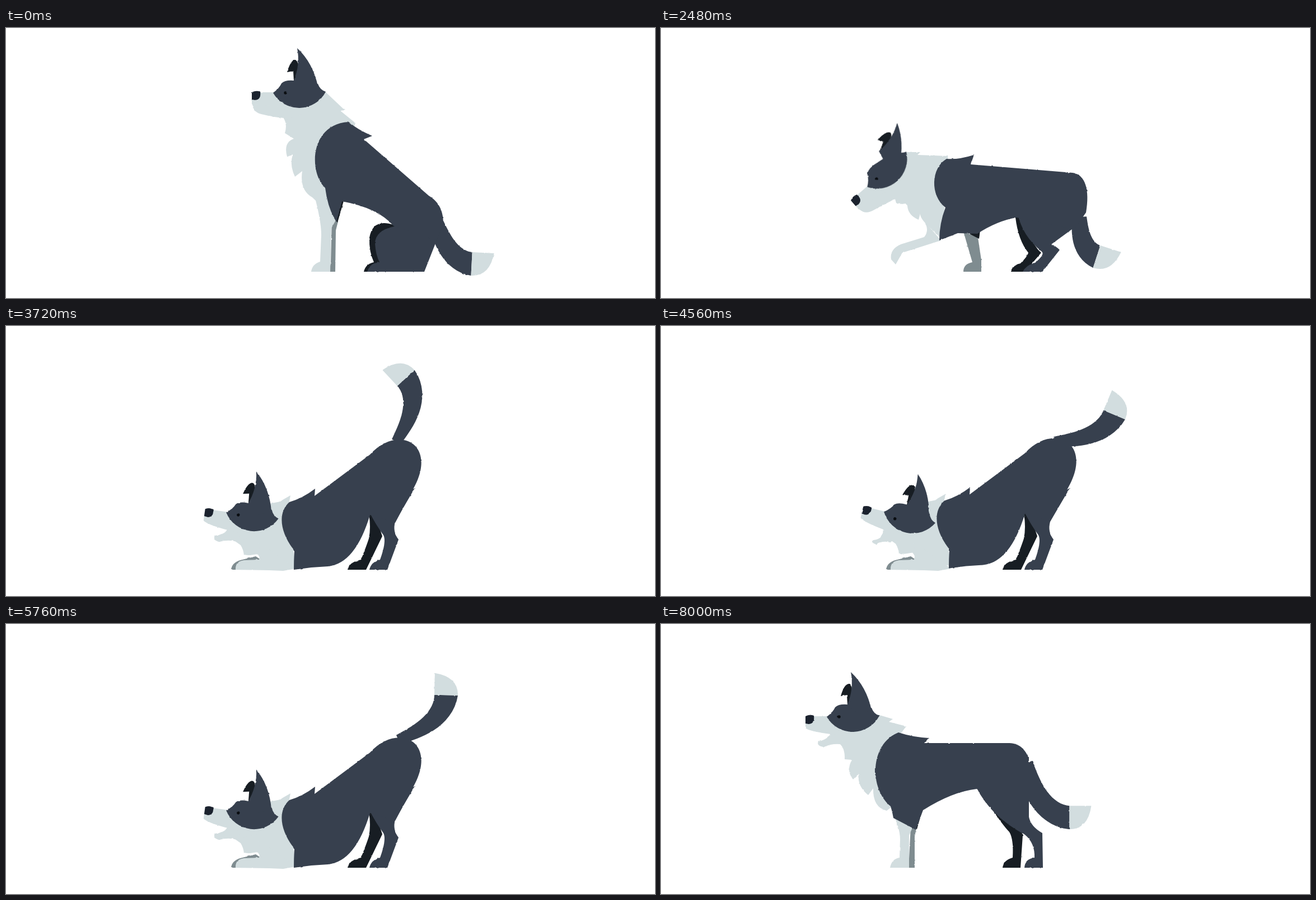
An HTML page that plays this animation: 1159x483 px, repeating every 8040 ms.

```html
<!DOCTYPE html>
<html lang="en">
<head>
<meta charset="utf-8">
<title>Dog</title>
<style>
html, body { margin: 0; width: 100%; height: 100%; overflow: hidden; background: #fff; }
svg { display: block; width: 100%; height: 100%; }
</style>
</head>
<body>
<svg viewBox="0 0 1159 483">
  <defs>
    <filter id="rough" filterUnits="userSpaceOnUse" x="200" y="20" width="700" height="450" color-interpolation-filters="sRGB">
      <feTurbulence type="fractalNoise" baseFrequency=".16" numOctaves="2" seed="4" result="n"/>
      <feDisplacementMap in="SourceGraphic" in2="n" scale="2.2" xChannelSelector="R" yChannelSelector="G"/>
    </filter>
  </defs>
  <g filter="url(#rough)">
    <path id="tail" fill="#37404e"/>
    <path id="tip" fill="#d2dddf"/>
    <g id="parts"></g>
    <g id="head">
      <path fill="#d2dddf" d="M478 115L439 115L439 136Q445 142 484 147L500 165L540 150L562 122Z"/>
      <path id="jaw" fill="#d2dddf"/>
      <path fill="#1b222e" d="M439 115Q447 111 454 114Q456 128 445 129L439 128Z"/>
      <path id="farEar" fill="#171d23" d="M514 95L513 77L502 79Q508 57 517 57Q523 60 523 75L519 97Z"/>
      <path fill="#37404e" d="M477 116A53.5 53.5 0 0 0 571 114Q561 111 557 100L513 94Q498 93 492 99Q488 108 477 116Z"/>
      <path id="ear" fill="#37404e" d="M513 96Q526 66 520 36Q548 62 557 104L535 112Z"/>
      <ellipse id="eye" cx="499" cy="116" rx="2.7" ry="2.7" fill="#0a0d11"/>
    </g>
  </g>
</svg>
<script>
const LOOP = 8040, STEP = 40, WAG = 552;
const DARK = '#37404e', PALE = '#d2dddf', GREY = '#7f8c90', BLACK = '#171d23';
const $ = id => document.getElementById(id);
const lerp = (a, b, k) => a + (b - a) * k;
const ease = k => k < .5 ? 4 * k ** 3 : 1 - 4 * (1 - k) ** 3;
const wave = (t, period) => .5 - .5 * Math.cos(2 * Math.PI * t / period);
const bob = t => 1.08 * wave(t - 3720, 2040);

// Poses: 0 sit, 1 prowl, 2 bow, 3 stretch, 4 stand
const moves = [[1700, 2480, 0, 1], [2480, 3280, 1, 2], [5900, 6640, 2, 3], [6720, 7560, 3, 4]];

const farHind = [
  'M692 352Q655 340 649 375Q648 400 657 419Q642 422 639 436L670 436L670 400Q665 385 680 365L695 355Z',
  'M633 339Q638 380 656 402Q655 408 642 421Q628 424 625 436L650 436L679 402Q665 390 660 370L645 335Z',
  'M648 336Q652 360 648 380Q645 390 634 418Q613 422 610 436L643 436L672 376Q670 370 665 355L655 330Z',
  'M595 315Q612 350 626 370Q632 390 630 418Q613 422 610 436L643 436L651 378Q640 365 640 350L610 315Z',
  'M580 315Q610 360 622 372Q630 385 628 418Q612 422 610 436L642 436L646 378Q640 360 635 350L610 315Z'];

const nearHind = [
  'M693 355Q660 362 659 385Q660 405 667 419Q650 420 645 436L747 436L769 380Q773 370 778 360L760 320Z',
  'M637 332Q645 372 680 400Q686 405 668 420Q652 424 646 436L681 436L712 397Q705 390 697 387L738 357Z',
  'M650 335Q662 358 674 374Q680 385 668 418Q652 422 649 436L681 436L701 382Q690 368 695 350L730 290Z',
  'M580 299Q610 360 650 378Q668 388 666 418Q650 422 649 436L681 436L685 377Q664 360 666 345L672 270Z',
  'M564 294Q590 345 650 377Q668 392 667 418Q650 420 649 436L682 436L681 374Q660 362 657 345L657 285Z'];

const farFore = [
  'M582 340L580 420Q578 430 578 436L588 436L589 362L593 346Z',
  'M540 364L556 419Q540 422 540 436L572 436L572 415L566 375Z',
  'M446 412L418 419Q403 424 402 436L412 436L430 420L455 418Z',
  'M466 372L447 420Q443 430 443 436L449 436L478 392L482 376Z',
  'M446 362L443 420Q443 430 443 436L453 436L453 380L456 366Z'];

const farElbow = [
  'M594 305L604 306L592 348L584 338Z',
  'M550 360L570 362L568 377L552 369Z',
  'M540 410L555 410L555 425L540 425Z',
  'M478 345L490 346L482 379L468 372Z',
  'M458 328L468 328L457 367L445 360Z'];

const nearFore = [
  'M550 297Q563 345 563 370L561 418Q547 422 545 436L579 436L581 358L590 342Z',
  'M470 345Q480 362 470 374L428 387Q408 396 411 414L419 423L431 402L500 380Z',
  'M450 385Q455 405 452 418L425 419Q409 421 410 436L470 437L495 438L518 434Z',
  'M436 355Q446 375 442 390L431 418Q412 422 409 436L443 436L463 385L470 373Z',
  'M412 335Q427 365 427 385L426 418Q412 420 409 436L443 436L443 378L460 340Z'];

const chest = [
  'M568 112L605 147L597 148L624 170L615 200L588 342L547 303Q524 290 529 256L516 266Q506 245 512 227L502 230Q495 205 514 198L498 188Q503 172 495 160L505 125Z',
  'M438 222L463 222L458 227L512 229L515 250L500 376L478 355Q462 340 463 332L460 343Q441 335 440 318L438 314Q425 316 420 313L418 306Q405 312 386 323L400 285Z',
  'M470 318L490 314L494 311L508 303L503 330L518 432L455 420Q453 412 449 408L436 410Q428 410 426 409L425 410Q424 400 419 392L412 387Q403 380 392 380L410 350Z',
  'M358 222L391 220L388 223L423 217L415 240L437 354L408 346Q385 342 373 326L371 331Q350 325 350 304L332 307Q328 300 325 296L318 295Q310 292 300 294L310 262Z',
  'M387 162L414 170L407 175L438 183L425 200L412 327L403 334Q378 328 379 294L370 306Q350 290 353 268L343 278Q330 262 341 243L328 242Q329 220 316 212L325 175Z'];

const body = [
  'M612 168Q628 182 654 193L639 199L755 300C775 312 781 330 781 350L769 380L692 354Q665 322 600 310L590 347L586 340Q574 318 570 286C541 260 541 172 612 168Z',
  'M510 234Q530 236 559 227L553 244L735 259C758 262 766 290 759 330L738 360L635 339Q600 345 565 368L530 367L497 380Q497 350 508 321C480 300 482 250 510 234Z',
  'M506 315Q530 308 552 291L551 304L650 230C700 175 772 210 728 290L695 352L650 338Q624 425 575 430L545 432L514 436Q514 420 515 402C490 370 484 335 506 315Z',
  'M416 228Q440 229 469 219L463 231L618 213C645 206 660 218 674 240L667 350L580 299Q540 310 490 352L470 375L437 361Q433 352 430 350C390 310 386 250 416 228Z',
  'M424 194Q448 202 478 204L470 213L622 213C642 214 650 225 657 240L657 350L564 295Q520 300 468 333L455 368L415 347Q413 335 410 326C372 295 372 215 424 194Z'];

const jaw = [
  'M483 140Q460 138 440 136Q441 152 460 155Q480 160 497 161L510 150Z',
  'M483 146Q480 156 462 160Q458 168 472 170Q485 164 500 165L510 150Z'];

// Eye socket x and y, head turn, ear turn, mouth opening, eye drop
const heads = [
  [499, 116, 0, 0, 0, 0],
  [385, 270, -41, 67, 0, 0],
  [415, 336.5, 8, 0, 1, 1.5],
  [299, 248, -19, -26, .8, 0],
  [318, 166, 0, 0, 1, 0]];

// Root x, root y, start angle, bend, length, root width
const tails = [
  [768, 350, 68, -65, 101, 28],
  [747, 338, 87, -69, 82, 26],
  [697, 207, -58, -73, 123, 18],
  [662, 240, 51, -77, 135, 24],
  [648, 250, 71, -71, 134, 32]];

// The last value marks parts that rise with the chest during the bow
const parts = [[farHind, BLACK], [farFore, GREY], [farElbow, BLACK], [chest, PALE, 1],
  [nearFore, PALE], [nearHind, DARK], [body, DARK, 1]].map(([poses, fill, rises]) => {
  const el = document.createElementNS('http://www.w3.org/2000/svg', 'path');
  el.setAttribute('fill', fill);
  $('parts').append(el);
  return { el, poses, rises };
});

function mixPath(a, b, k) {
  const to = b.match(/\d+/g);
  let i = 0;
  return a.replace(/\d+/g, v => lerp(+v, +to[i++], k).toFixed(1));
}
const mixList = (a, b, k) => a.map((v, i) => lerp(v, b[i], k));

function poseAt(t) {
  let now = [0, 0, 0];
  for (const [start, end, a, b] of moves)
    if (t >= start) now = [a, b, ease(Math.min(1, (t - start) / (end - start)))];
  return now;
}

function tailPose(i, t) {
  const p = [...tails[i]];
  if (i === 0) p[2] += 14 * wave(t, WAG);
  if (i === 2) {
    const w = 1.1 * wave(t - 3720, WAG) - .03;
    p[0] += 5 * w;
    p[2] += 49 * w;
    p[3] += 11 * w;
  }
  return p;
}

function headPose(i, t) {
  const nod = i === 2 ? bob(t) : 0;
  const shift = [4.5, 1, 5.5, 0, .4, 6];
  return heads[i].map((v, j) => v + shift[j] * nod);
}

function drawTail([x, y, start, bend, length, width]) {
  const N = 16, inner = [], outer = [];
  let dx, dy;
  for (let i = 0; i <= N; i++) {
    const s = i / N, a = (start + bend * s * s) * Math.PI / 180;
    const half = lerp(width, 42, s) / 2;
    dx = Math.cos(a);
    dy = Math.sin(a);
    inner.push([x + dy * half, y - dx * half]);
    outer.push([x - dy * half, y + dx * half]);
    x += dx * length / N;
    y += dy * length / N;
  }
  const ahead = ([px, py], d) => [px + dx * d, py + dy * d];
  const a = inner[N], b = outer[N];
  $('tail').setAttribute('d', 'M' + [...inner, ...outer.reverse()].join('L') + 'Z');
  $('tip').setAttribute('d', `M${a}L${ahead(a, 39)}Q${ahead(b, 33)} ${b}Z`);
}

function drawHead([x, y, turn, ear, mouth, drop], t) {
  $('head').setAttribute('transform', `translate(${x} ${y}) rotate(${turn}) translate(-499 -116)`);
  for (const id of ['ear', 'farEar']) $(id).setAttribute('transform', `rotate(${ear} 535 105)`);
  $('jaw').setAttribute('d', mixPath(jaw[0], jaw[1], mouth));
  const blink = [560, 1320].some(b => Math.abs(t - b) < 70);
  $('eye').setAttribute('ry', blink ? .6 : 2.7);
  $('eye').setAttribute('cy', 116 + drop);
}

function draw(t) {
  const [a, b, k] = poseAt(t);
  const bow = (a === 2 ? 1 - k : 0) + (b === 2 ? k : 0);
  for (const { el, poses, rises } of parts) {
    el.setAttribute('d', mixPath(poses[a], poses[b], k));
    if (rises) el.setAttribute('transform', `translate(0 ${-2.5 * bow * bob(t)})`);
  }
  drawTail(mixList(tailPose(a, t), tailPose(b, t), k));
  drawHead(mixList(headPose(a, t), headPose(b, t), k), t);
}

const begin = performance.now();
function tick() {
  const t = (performance.now() - begin) % LOOP;
  draw(Math.floor(t / STEP) * STEP);
  requestAnimationFrame(tick);
}
tick();
</script>
</body>
</html>
```
